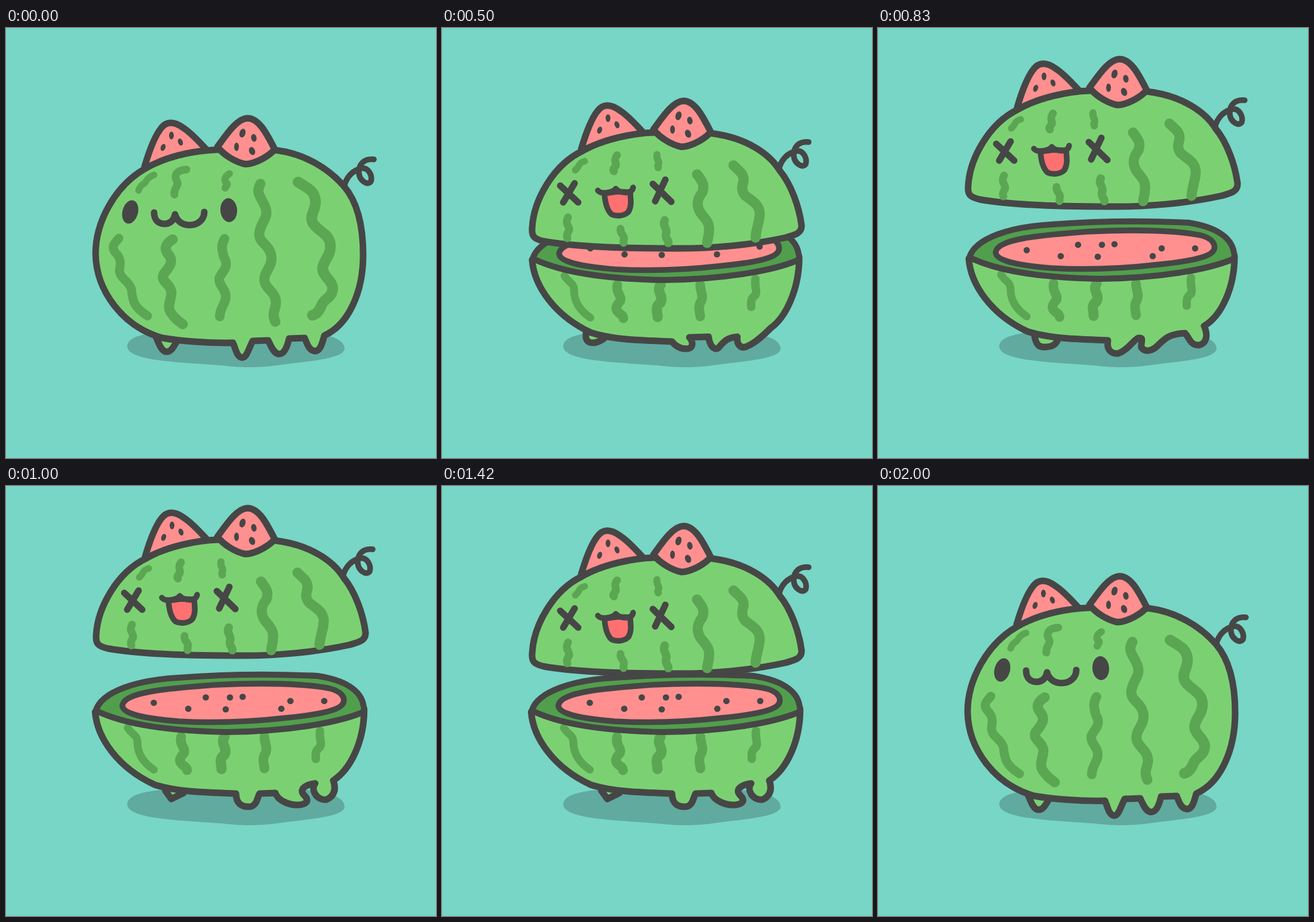
These frames come from a looping animation (720 px wide and 720 px high, 2080 ms). An HTML page:

```html
<!DOCTYPE html>
<html>
<head>
<meta charset="utf-8">
<style>
html, body { margin: 0; width: 100%; height: 100%; overflow: hidden; background: #78d6c6; }
svg { display: block; width: 100%; height: 100%; }
.line { stroke: #464646; stroke-width: 11; stroke-linecap: round; stroke-linejoin: round; fill: none; }
.skin { fill: #7bd172; }
.pink { fill: #ff908f; }
.dark { fill: #464646; }
.thin { stroke-width: 9.5; }
</style>
</head>
<body>
<svg viewBox="0 0 720 720">
  <path fill="#61aa9f" d="M203 533C204 510 260 505 385 505C500 505 566 510 567 537C566 555 500 558 460 564C420 570 390 568 370 566C310 560 203 560 203 533Z"/>
  <g id="whole"></g>
  <g id="bowl"></g>
  <g id="lid"></g>
</svg>
<script>
const LOOP = 2080, STEPS = 25;
const $ = id => document.getElementById(id);
const path = (d, cls) => `<path class="${cls}" d="${d}"/>`;
const stripe = (width, d) =>
  `<path d="${d}" fill="none" stroke="#5ba653" stroke-width="${width}" stroke-linecap="round" stroke-linejoin="round"/>`;
const oval = (x, y, rx, ry = rx, turn = 0) =>
  `<ellipse class="dark" rx="${rx}" ry="${ry}" transform="translate(${x} ${y}) rotate(${turn})"/>`;
const shift = (x, y, inner) => `<g transform="translate(${x} ${y})">${inner}</g>`;

const leftEar = path('M232 232C240 205 252 170 267 161C278 155 290 162 298 168C310 176 325 192 335 203L300 225Z', 'line pink')
  + oval(277, 180, 4, 6.5) + oval(263, 200, 4, 6, 20) + oval(292, 191, 4, 6, -20);
const rightEar = path('M354 199C368 180 386 152 404 151C424 151 437 178 450 203C442 213 420 227 401 228C385 225 365 213 354 199Z', 'line pink')
  + oval(396, 176, 5, 7.5, 15) + oval(415, 184, 4.5, 6.5, -12) + oval(386, 199, 4, 7) + oval(412, 206, 5, 7, -20);
const tail = path('M566 266C570 248 582 238 595 235C606 233 614 246 611 257C605 265 592 255 591 243C590 228 600 218 616 220', 'line thin');

const wholeStripes = [
  [11, 'M248 246C236 250 236 256 232 260C224 264 224 268 222 272'],
  [13, 'M302 237C285 238 281 247 286 256C291 264 280 268 282 279'],
  [12, 'M374 244C366 249 364 255 370 260C372 264 366 266 367 268'],
  [17, 'M426 261C418 275 425 280 433 297C443 318 425 325 424 345C424 360 440 362 444 380C448 400 430 408 433 425C436 438 452 442 452 460C452 472 444 475 451 492'],
  [18, 'M489 258C505 268 516 272 518 288C520 305 508 312 513 325C520 340 541 343 543 362C545 382 531 388 530 403C531 417 546 422 547 435C547 452 532 453 528 465C524 475 518 480 513 481'],
  [15, 'M189 352C180 362 176 366 183 376C193 385 192 395 190 405C190 420 205 422 210 437C212 455 212 466 237 482'],
  [17, 'M279 354C266 362 265 370 271 378C282 390 274 400 264 412C258 425 276 428 277 443C276 458 270 465 275 475C281 485 288 490 296 496'],
  [16, 'M366 353C360 363 361 370 365 384C375 400 362 407 357 419C356 432 369 438 368 450C368 462 358 468 358 483']
];
const lidStripes = [
  [11, 'M239 223C228 226 230 231 227 234L223 238'],
  [13, 'M293 213C286 222 293 226 291 231C285 237 287 239 288 240'],
  [12, 'M360 212C358 222 366 222 362 229C360 232 363 233 362 234'],
  [17, 'M427 245C437 258 440 263 436 275C428 285 425 295 432 308C440 320 449 325 447 340C447 350 444 355 444 360'],
  [17, 'M488 230C498 240 505 243 505 255C503 265 500 270 507 280C520 290 531 295 532 310C532 325 526 335 525 351'],
  [13, 'M211 317C205 328 214 332 213 338C209 346 208 348 210 352'],
  [13, 'M299 336C297 346 308 347 304 355L304 360'],
  [14, 'M373 322C368 332 379 336 375 345C373 353 380 355 379 360']
];
const bowlStripes = [
  [13, 'M206 413C212 424 222 424 222 438C222 455 230 470 249 483'],
  [16, 'M294 428C291 442 302 446 299 455C290 465 290 470 298 476C304 480 304 482 304 484'],
  [17, 'M366 428C358 440 372 445 366 458C355 465 362 476 361 482'],
  [16, 'M432 428C432 440 438 445 434 455C427 465 432 475 432 481'],
  [14, 'M524 418C522 432 528 438 524 445C515 452 517 458 517 465']
];
const stripes = list => list.map(([w, d]) => stripe(w, d)).join('');

// Closed melon, standing.
$('whole').innerHTML = leftEar + tail
  + path('M250 514C258 535 262 543 271 542C279 540 282 530 288 522', 'line skin')
  + path('M150 378C150 325 182 265 232 236C270 214 315 206 350 204C400 200 430 202 455 205C500 211 540 235 566 265'
    + 'C590 293 598 335 598 380C598 440 575 496 533 515C529 530 526 541 517 541C507 540 504 528 500 519L474 520'
    + 'C470 537 465 546 457 546C448 545 444 533 439 523L413 524C405 540 403 552 395 552C386 550 385 538 380 527'
    + 'C340 528 290 524 262 519C195 500 151 440 150 378Z', 'line skin')
  + stripes(wholeStripes) + rightEar
  + oval(208, 308, 13, 20, 15) + oval(373, 305, 14, 20, -4)
  + path('M248 309C248 322 256 328 265 328C276 328 282 320 283 312C286 323 295 330 307 330C320 330 332 322 332 308', 'line');

// Upper half with the dizzy face.
$('lid').innerHTML = shift(1, -29, leftEar) + shift(-2, -29, tail)
  + path('M151 335C153 290 185 230 235 206C270 186 320 176 355 175C400 171 440 174 462 178C510 186 548 210 565 238'
    + 'C585 262 598 300 602 330C603 344 590 347 575 351C520 363 450 370 385 369C310 369 220 366 170 357C153 353 150 348 151 335Z', 'line skin')
  + stripes(lidStripes) + shift(0, -29, rightEar)
  + path('M198 264L228 292M222 260L203 292M353 261L384 291M374 254L357 290', 'line')
  + '<path class="line thin" fill="#ff7171" style="fill:#ff7171" d="M272 277C273 292 276 305 284 312C292 316 305 315 312 308C318 298 316 287 315 275L293 274Z"/>'
  + path('M261 272C266 279 286 276 291 269C297 276 318 280 320 267', 'line thin');

// Lower half: dy and sx move the shell, seeds shift by their own amount.
const poses = {
  stand: {
    dy: 0, sx: 1, seeds: 0,
    back: 'M262 515C265 533 271 535 282 534C296 533 300 527 302 518',
    front: 'C382 540 392 546 402 545C418 540 428 522 436 519C446 518 440 524 441 535C448 544 460 540 468 532C480 520 488 512 514 511C521 517 522 532 538 531C552 527 552 512 546 499'
  },
  step: {
    dy: 2, sx: 1.005, seeds: -5,
    back: 'M242 508C240 520 244 526 256 525C266 523 272 518 276 514',
    front: 'C390 530 400 536 410 535C422 534 420 523 414 516L446 515C448 530 455 538 462 534C472 522 478 516 494 515C492 528 500 536 510 531C525 525 540 510 550 500'
  },
  hop: {
    dy: -8, sx: 1.012, seeds: -1,
    back: 'M268 518L278 532L298 522',
    front: 'C385 540 395 546 408 545C420 543 420 530 424 523L450 522C455 536 475 543 490 542C505 540 505 533 498 526C488 516 500 508 516 506C508 516 518 535 535 533C550 526 550 513 546 501'
  }
};
const seeds = [[249, 372], [306, 382], [335, 363], [368, 383], [375, 363], [396, 362], [460, 382], [475, 369], [531, 369]];
const bowl = p => `<g transform="translate(${375 * (1 - p.sx)} ${p.dy}) scale(${p.sx} 1)">`
  + path(p.back, 'line skin')
  + path(`M152 386C155 430 190 480 250 508C290 521 340 521 385 523${p.front}C575 482 597 435 597 382`, 'line skin')
  + stripes(bowlStripes)
  + '<path class="line" style="fill:#519f4c;stroke-width:10" d="M153 384C163 352 220 333 290 329C370 323 440 322 520 326C565 333 592 350 596 376C598 382 597 385 592 388C550 405 470 419 370 420C270 418 200 407 153 384Z"/>'
  + path('M197 375C201 353 270 347 350 341C430 337 500 339 540 347C560 352 565 362 563 370C560 382 530 390 470 396C400 404 340 405 290 402C230 397 196 389 197 375Z', 'line thin pink')
  + seeds.map(([x, y]) => oval(x, y + p.seeds, 5.3)).join('') + '</g>';
const bowls = {};
for (const name in poses) bowls[name] = bowl(poses[name]);

const gait = ['stand', 'step', 'hop', 'hop', 'stand'];
// Lid height for each step of the open part.
const lift = [29, 29, 27, 22, 12, 0, -15, -35, -53, -70, -79, -85, -88, -86, -81, -71, -55, -34, -9, 14, 27];

let last = -1;
function draw(ms) {
  const step = Math.floor((ms + 4) * STEPS / LOOP) % STEPS;
  if (step === last) return;
  last = step;
  const open = step > 0 && step <= lift.length;
  $('whole').style.display = open ? 'none' : '';
  $('lid').style.display = $('bowl').style.display = open ? '' : 'none';
  if (!open) return;
  $('bowl').innerHTML = bowls[gait[step % gait.length]];
  $('lid').setAttribute('transform', `translate(0 ${lift[step - 1]})`);
}

let start = null;
function tick(now) {
  if (start === null) start = now;
  draw((now - start) % LOOP);
  requestAnimationFrame(tick);
}
draw(0);
requestAnimationFrame(tick);
</script>
</body>
</html>
```
